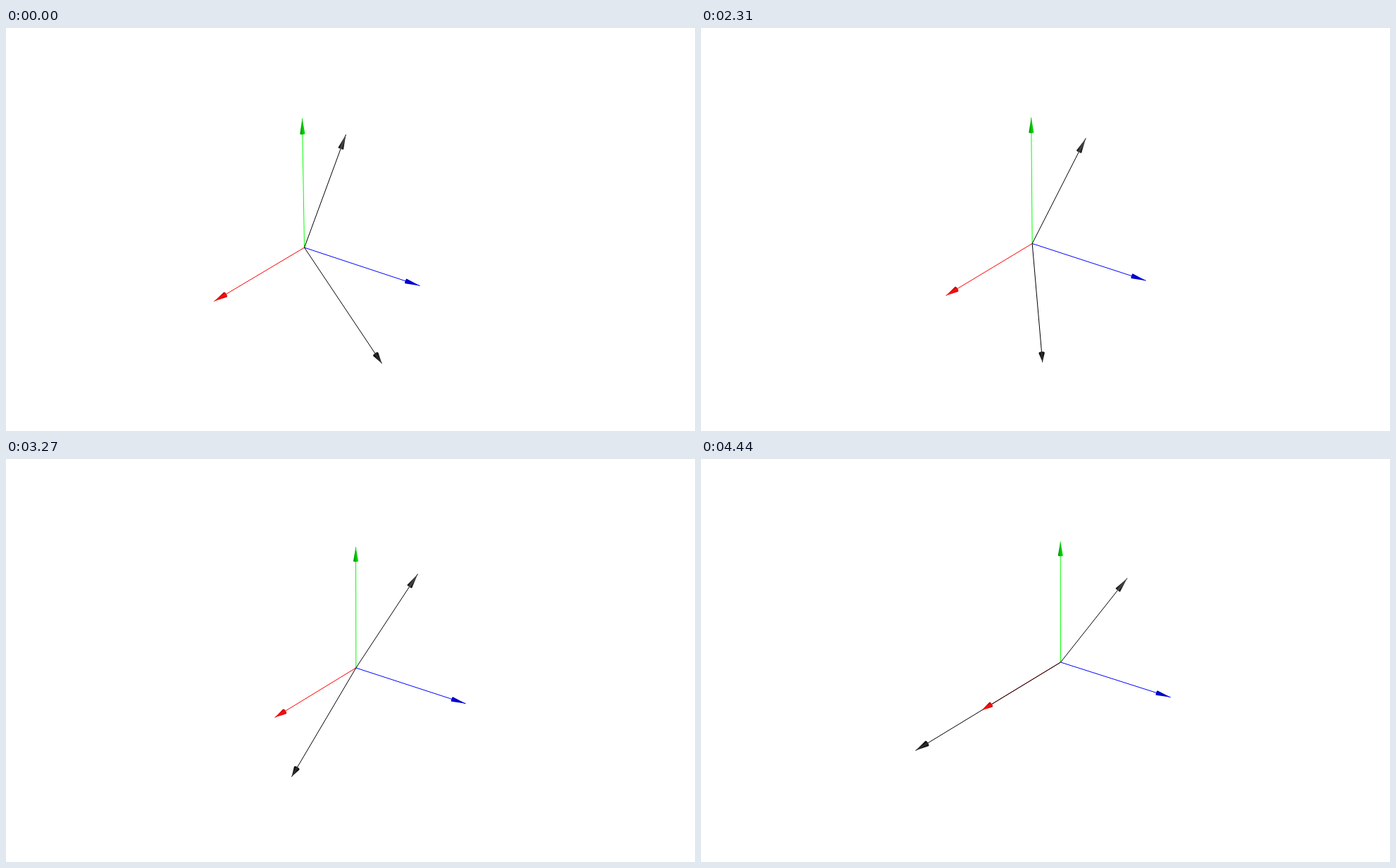
An HTML page with a canvas that plays this animation: 978 by 573 pixels, repeating every 8000 ms.

```html
<!DOCTYPE html>
<html>
<head>
<meta charset="utf-8">
<style>
html, body { margin: 0; width: 100%; height: 100%; overflow: hidden; background: #fff; }
canvas { display: block; }
</style>
</head>
<body>
<canvas id="stage" width="978" height="573"></canvas>
<script>
const ctx = document.getElementById('stage').getContext('2d');
const LOOP = 8000, TICK = 30;

// Pose times; the drift of the view breaks sharply at BREAK.
const times = [1470, 1950, 2550, 2700, 3270, 3810, 4440];
const BREAK = 2;
const START = times[0], END = times[times.length - 1];

const origin = {
  x: [423, 450, 482.7, 485.5, 496.3, 503.7, 510],
  y: [311.7, 308.3, 304.5, 303.4, 296.5, 291.8, 288.5]
};

// head: length as a share of the arrow, first and last pose
const arrows = [
  { x: [295, 325, 362, 366, 381, 390, 397.5], y: [388, 383, 378, 376.5, 367, 361, 357],
    line: '#f00', shade: ['#d00000', '#ff1010', '#a00000'], head: [.122, .118], width: 8, base: 2 },
  { x: [420, 448, 481.6, 485, 496, 503.5, 509.7], y: [128, 127.3, 126.3, 126, 124.5, 122, 117],
    line: '#0f0', shade: ['#008800', '#00c400', '#00e000'], head: [.118, .114], width: 7, base: 1.3 },
  { x: [587, 612, 643.9, 646, 652, 658, 666], y: [366, 361.5, 356.8, 355.5, 347.3, 341.5, 338.3],
    line: '#00f', shade: ['#0000a0', '#0000e0', '#0000b0'], head: [.122, .126], width: 7, base: .8 },
  { x: [482, 519.5, 563, 568, 584, 595.3, 604.5], y: [151, 153.5, 158, 159.5, 163, 166, 169],
    line: '#000', shade: ['#000', '#4a4a4a', '#000'], head: [.122, .14], width: 8, base: .8 },
  { x: [533, 505, 470.5, 456.3, 405, 358, 304], y: [476.5, 477, 473, 469.5, 451.3, 434, 414],
    line: '#000', shade: ['#000', '#303030', '#000'], head: [.078, .078], width: 8.5, base: 2 }
];

const slope = (v, a, b) => (v[b] - v[a]) / (times[b] - times[a]);

// Cubic Hermite through the poses, kept separate on each side of the break.
function sample(v, t) {
  let i = 0;
  while (i < times.length - 2 && t >= times[i + 1]) i++;
  const lo = i < BREAK ? 0 : BREAK;
  const hi = i < BREAK ? BREAK : times.length - 1;
  const tangent = k => slope(v, Math.max(lo, k - 1), Math.min(hi, k + 1));
  const span = times[i + 1] - times[i], u = (t - times[i]) / span;
  const ease = u * u * (3 - 2 * u);
  return v[i] + (v[i + 1] - v[i]) * ease
    + span * u * (1 - u) * ((1 - u) * tangent(i) - u * tangent(i + 1));
}

const pointAt = (p, t) => ({ x: sample(p.x, t), y: sample(p.y, t) });

function drawShaft(o, tip, color) {
  ctx.strokeStyle = color;
  ctx.beginPath();
  ctx.moveTo(o.x, o.y);
  ctx.lineTo(tip.x, tip.y);
  ctx.stroke();
}

function drawHead(o, tip, arrow, progress) {
  const dx = tip.x - o.x, dy = tip.y - o.y;
  const [first, last] = arrow.head;
  const length = Math.hypot(dx, dy) * (first + (last - first) * progress);
  const r = arrow.width / 2;
  const fill = ctx.createLinearGradient(0, -r, 0, r);
  arrow.shade.forEach((c, i) => fill.addColorStop(i / 2, c));
  ctx.save();
  ctx.translate(tip.x, tip.y);
  ctx.rotate(Math.atan2(dy, dx));
  ctx.fillStyle = fill;
  ctx.beginPath();
  ctx.moveTo(0, 0);
  ctx.lineTo(-length, -r);
  ctx.ellipse(-length, 0, arrow.base, r, 0, -Math.PI / 2, Math.PI / 2, true);
  ctx.closePath();
  ctx.fill();
  ctx.restore();
}

function draw(time) {
  const tick = Math.floor(time % LOOP / TICK) * TICK;
  const t = Math.min(END, Math.max(START, tick));
  const progress = (t - START) / (END - START);
  const o = pointAt(origin, t);
  const tips = arrows.map(a => pointAt(a, t));
  ctx.setTransform(1, 0, 0, 1, 0, 0);
  ctx.fillStyle = '#fff';
  ctx.fillRect(0, 0, 978, 573);
  ctx.translate(.5, .5);
  ctx.lineWidth = 1;
  arrows.forEach((a, i) => drawShaft(o, tips[i], a.line));
  // Coloured heads stay in front of the black arrows.
  for (let i = arrows.length - 1; i >= 0; i--) drawHead(o, tips[i], arrows[i], progress);
}

const begin = performance.now();
function loop() {
  draw(performance.now() - begin);
  requestAnimationFrame(loop);
}
loop();
</script>
</body>
</html>
```
